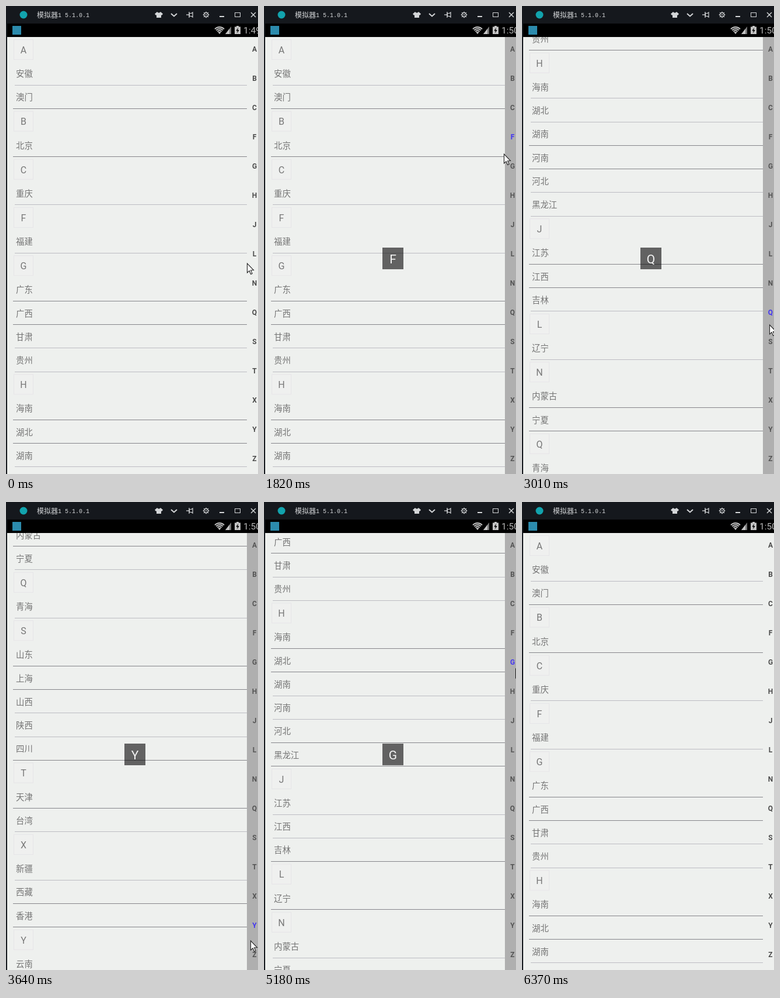
Write an HTML page with a canvas that moves like this. It is 432 px wide and 800 px high and loops after 6.44 s.

```html
<!DOCTYPE html>
<html lang="zh-CN">
<head>
<meta charset="utf-8">
<title>Indexed list</title>
<style>
html, body { margin: 0; width: 100%; height: 100%; overflow: hidden; background: #eef0ee; }
canvas { display: block; width: 432px; height: 800px; }
</style>
</head>
<body>
<canvas id="stage" width="432" height="800"></canvas>
<script>
const ctx = document.getElementById('stage').getContext('2d');
const LOOP = 6440, STEP = 70;
const TOP = 54, VIEW = 756, HEAD = 42, ROW = 40.25, BAND = 50;
const PRESS = 1050, RELEASE = 5880, SCROLL_TIME = 110;
const CJK = '"Noto Sans CJK SC", "Noto Sans CJK", sans-serif';
const LATIN = 'Roboto, sans-serif';

const groups = [
  'A 安徽 澳门', 'B 北京', 'C 重庆', 'F 福建', 'G 广东 广西 甘肃 贵州',
  'H 海南 湖北 湖南 河南 河北 黑龙江', 'J 江苏 江西 吉林', 'L 辽宁',
  'N 内蒙古 宁夏', 'Q 青海', 'S 山东 上海 山西 陕西 四川', 'T 天津 台湾',
  'X 新疆 西藏 香港', 'Y 云南', 'Z 浙江'
].map(s => {
  const [letter, ...items] = s.split(' ');
  return { letter, items };
});
let total = 0;
for (const g of groups) {
  g.top = total;
  total += HEAD + g.items.length * ROW;
  g.bottom = total;
}

// pointer path: time, x, y
const path = [
  [0, 413, 440], [280, 413, 440], [980, 415, 80], [1190, 414, 84],
  [1820, 411, 253], [3010, 424, 545], [3640, 419, 750], [3860, 420, 785],
  [4060, 421, 785], [4830, 426, 456], [5530, 436, 114.3], [5740, 437, 80],
  [6440, 445, 78]
];

function pointer(t) {
  let i = 1;
  while (i < path.length - 1 && path[i][0] < t) i++;
  const [t0, x0, y0] = path[i - 1], [t1, x1, y1] = path[i];
  const p = (t - t0) / (t1 - t0);
  return { x: x0 + (x1 - x0) * p, y: y0 + (y1 - y0) * p };
}

const isPressed = t => t >= PRESS && t < RELEASE;

function letterAt(t) {
  if (!isPressed(t)) return -1;
  const i = Math.floor((pointer(t).y - TOP) / BAND);
  return Math.max(0, Math.min(groups.length - 1, i));
}

// each newly touched letter starts a short scroll that brings its group into view
const moves = [{ t: 0, from: 0, to: 0 }];

function scrollAt(t) {
  let m = moves[0];
  for (const k of moves) if (k.t <= t) m = k;
  const left = 1 - Math.min(1, (t - m.t) / SCROLL_TIME);
  return m.to + (m.from - m.to) * left * left;
}

let last = -1;
for (let t = PRESS; t < RELEASE; t += 2) {
  const i = letterAt(t);
  if (i === last) continue;
  last = i;
  const from = scrollAt(t), goal = moves[moves.length - 1].to, g = groups[i];
  let to = goal;
  if (g.top < goal) to = g.top;
  else if (g.bottom - VIEW > goal) to = g.bottom - VIEW;
  if (to !== goal) moves.push({ t, from, to });
}

function rect(x, y, w, h, color) {
  ctx.fillStyle = color;
  ctx.fillRect(x, y, w, h);
}

function text(s, x, y, font, color, align = 'left') {
  ctx.font = font;
  ctx.fillStyle = color;
  ctx.textAlign = align;
  ctx.fillText(s, x, y);
}

function shape(points, fill, stroke, width = 1, closed = true) {
  ctx.beginPath();
  points.forEach(([x, y]) => ctx.lineTo(x, y));
  if (closed) ctx.closePath();
  if (fill) { ctx.fillStyle = fill; ctx.fill(); }
  if (stroke) { ctx.strokeStyle = stroke; ctx.lineWidth = width; ctx.stroke(); }
}

function disc(x, y, r, color) {
  ctx.beginPath();
  ctx.arc(x, y, r, 0, Math.PI * 2);
  ctx.fillStyle = color;
  ctx.fill();
}

function drawHeader(letter, y) {
  rect(13, y + 3, 34, 35, '#e6e5e8');
  rect(14, y + 4, 32, 33, '#eff0ef');
  text(letter, 30, y + 26.8, '16px ' + LATIN, '#777', 'center');
}

function drawItem(name, y) {
  text(name, 17, y + 25, '14.4px ' + CJK, '#757575');
  const edge = y + ROW - 1, part = edge - Math.floor(edge);
  const dark = part > 0.4 && part < 0.9;
  const x = dark ? 12 : 15;
  rect(x, Math.floor(edge - 0.1), 413 - x, 1, dark ? '#85858a' : '#bcbcc2');
}

function drawList(scroll) {
  for (const g of groups) {
    let y = TOP + g.top - scroll;
    if (y > 800 || TOP + g.bottom - scroll < 50) continue;
    drawHeader(g.letter, y);
    y += HEAD;
    for (const name of g.items) {
      drawItem(name, y);
      y += ROW;
    }
  }
}

function drawIndex(pressed, active) {
  if (pressed) rect(413, 53, 19, 747, '#afafaf');
  groups.forEach((g, i) => {
    const color = i === active ? '#4436f2' : pressed ? '#555' : '#4c4c4c';
    text(g.letter, 426, 78.3 + i * BAND, 'bold 12px ' + LATIN, color, 'center');
  });
}

function drawPopup(letter) {
  rect(203, 413, 36, 37, 'rgba(0,0,0,0.59)');
  text(letter, 221, 439.5, '21px ' + LATIN, '#f4f4f4', 'center');
}

function drawTitleBar() {
  const c = '#d4d6d8';
  rect(0, 0, 432, 30, '#15181d');
  disc(30, 15, 6.5, '#12a3ad');
  text('模拟器', 53, 19.5, '12px ' + CJK, c);
  text('1 5.1.0.1', 89, 19, '10px "Liberation Mono", monospace', c);

  shape([[259, 10], [261, 11.5], [263, 11.5], [265, 10], [269, 13.5], [267, 16],
    [266, 15.3], [266, 20], [258, 20], [258, 15.3], [257, 16], [255, 13.5]], c);
  shape([[283, 13], [288, 17.5], [293, 13]], null, c, 2, false);

  shape([[309, 15], [314, 15]], null, c, 1.3, false);
  shape([[314, 10], [314, 20]], null, c, 1.3, false);
  shape([[314.5, 12.5], [318, 12.5], [320, 11], [320, 19], [318, 17.5], [314.5, 17.5]], null, c, 1.2);

  for (let k = 0; k < 8; k++) {
    const a = k * Math.PI / 4, u = Math.cos(a), v = Math.sin(a);
    shape([[343 + u * 3.5, 15 + v * 3.5], [343 + u * 5.3, 15 + v * 5.3]], null, c, 1.5, false);
  }
  disc(343, 15, 3.9, c);
  disc(343, 15, 2.7, '#15181d');
  disc(343, 15, 1.1, c);

  rect(366, 17, 8, 2, c);
  ctx.strokeStyle = c;
  ctx.lineWidth = 1;
  ctx.strokeRect(392.5, 11.5, 9, 7);
  shape([[420, 11], [428, 19]], null, c, 1.4, false);
  shape([[428, 11], [420, 19]], null, c, 1.4, false);
}

function drawStatusBar(t) {
  const c = '#c4c4c4';
  rect(2, 30, 430, 23, '#000');
  rect(11, 34, 15, 15, '#2c8bad');

  ctx.lineWidth = 1.8;
  ctx.strokeStyle = c;
  for (const r of [5, 8, 11]) {
    ctx.beginPath();
    ctx.arc(366, 47, r, -Math.PI * 0.76, -Math.PI * 0.24);
    ctx.stroke();
  }
  shape([[366, 48], [363, 44.3], [369, 44.3]], c);

  shape([[376, 48], [386, 48], [386, 35]], '#777');
  shape([[376, 48], [383, 48], [383, 39]], c);

  rect(395, 34, 4, 2, c);
  rect(392, 35.5, 10, 12.5, c);
  shape([[398, 37], [394.3, 42.5], [396.8, 42.5], [396, 46.5], [399.7, 41], [397.2, 41]], '#000');
  text(t < 910 ? '1:49' : '1:50', 407, 47, '15.5px ' + LATIN, '#b8b8b8');
}

function drawPointer({ x, y }) {
  ctx.save();
  ctx.translate(Math.round(x) + 0.5, Math.round(y));
  shape([[0, 0], [0, 16], [3.6, 12.7], [6.2, 18.5], [8.6, 17.4], [6.1, 11.7], [11, 11.5]],
    '#fafafa', '#222', 1.1);
  ctx.restore();
}

function draw(t) {
  const active = letterAt(t), pressed = isPressed(t);
  rect(0, 0, 432, 800, '#eef0ee');
  drawList(scrollAt(t));
  drawIndex(pressed, active);
  if (pressed) drawPopup(groups[active].letter);
  rect(0, 30, 2, 770, '#171b20');
  drawTitleBar();
  drawStatusBar(t);
  drawPointer(pointer(t));
}

function tick(now) {
  draw(Math.floor((now % LOOP) / STEP) * STEP);
  requestAnimationFrame(tick);
}
draw(0);
requestAnimationFrame(tick);
</script>
</body>
</html>
```
